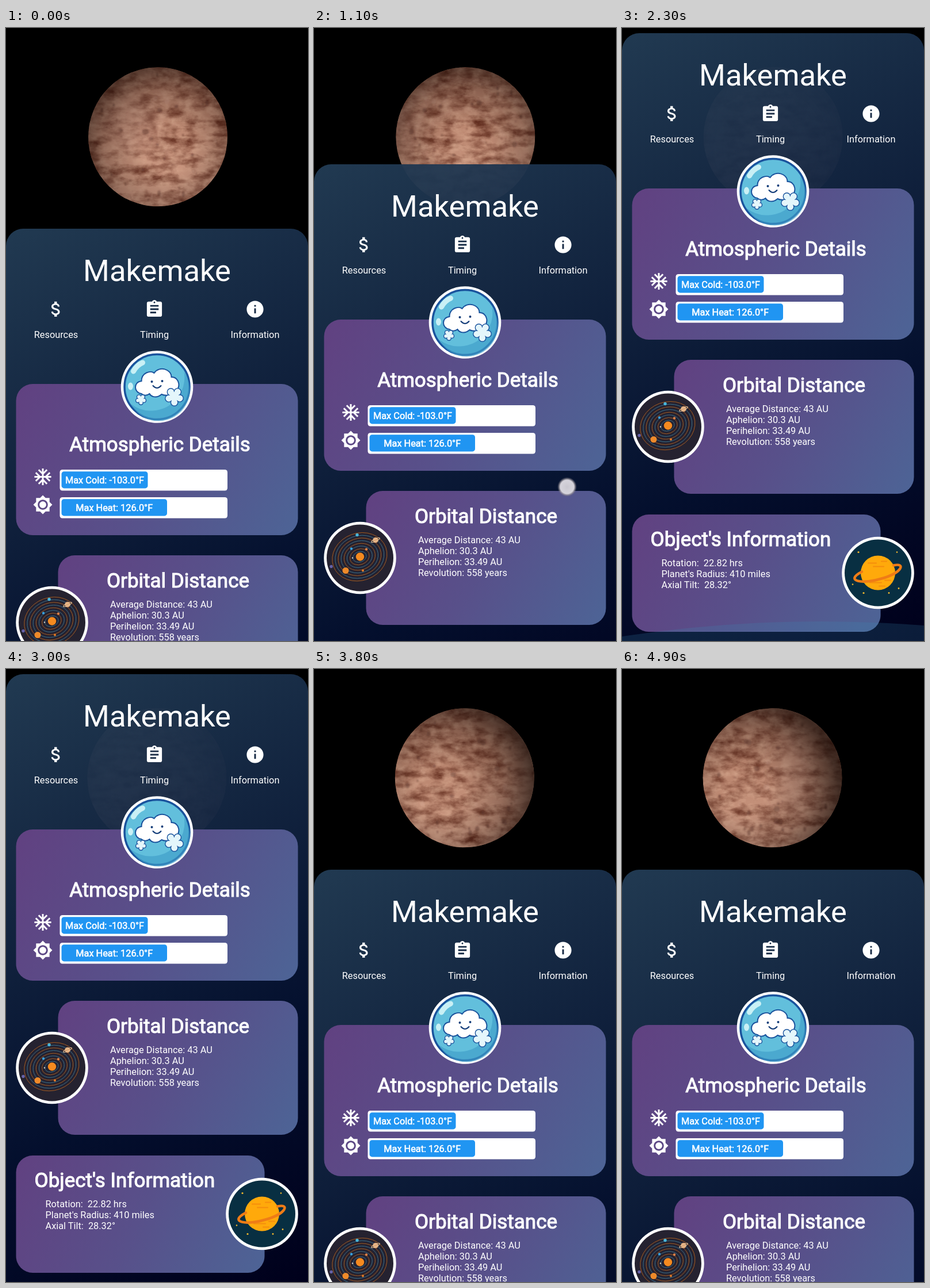
Animation of 525x1066 px, one loop 5 s. Source, as an HTML page:

```html
<!DOCTYPE html>
<html lang="en">
<head>
<meta charset="utf-8">
<title>Makemake</title>
<style>
  html, body { margin: 0; width: 100%; height: 100%; overflow: hidden; background: #000; }
  svg { display: block; width: 525px; height: 1066px; }
  text { font: 16.33px Roboto, sans-serif; fill: #fff; white-space: pre; }
  .title { font-size: 52.5px; }
  .heading { font-size: 35px; stroke: #fff; stroke-width: 1.1px; }
  .value { stroke: #fff; stroke-width: .55px; }
  .mid { text-anchor: middle; }
</style>
</head>
<body>
<svg viewBox="0 0 525 1066" xmlns="http://www.w3.org/2000/svg">
  <defs id="defs">
    <linearGradient id="panelFill" gradientUnits="userSpaceOnUse" x1="0" y1="0" x2="525" y2="1057">
      <stop offset="0" stop-color="#233d56"/>
      <stop offset=".65" stop-color="#041030"/>
      <stop offset="1" stop-color="#00001d"/>
    </linearGradient>
    <linearGradient id="cardStops">
      <stop offset="0" stop-color="#614181"/>
      <stop offset=".5" stop-color="#58508a"/>
      <stop offset="1" stop-color="#4d6496"/>
    </linearGradient>
    <radialGradient id="shade" gradientUnits="userSpaceOnUse" cy="22" r="165">
      <stop offset=".25" stop-color="#1c0d09" stop-opacity="0"/>
      <stop offset=".65" stop-color="#1c0d09" stop-opacity=".28"/>
      <stop offset="1" stop-color="#120805" stop-opacity=".72"/>
    </radialGradient>
    <linearGradient id="surface" x1="0" y1="0" x2=".2" y2="1">
      <stop offset="0" stop-color="#ad7b66"/>
      <stop offset=".5" stop-color="#bb8770"/>
      <stop offset="1" stop-color="#cd9b84"/>
    </linearGradient>
    <radialGradient id="touchFill">
      <stop offset="0" stop-color="#c9c7d0"/>
      <stop offset=".7" stop-color="#d6d4dc"/>
      <stop offset=".8" stop-color="#aaa5ab" stop-opacity=".8"/>
      <stop offset="1" stop-color="#6d6870" stop-opacity="0"/>
    </radialGradient>
    <filter id="darkGrain" x="0" y="0" width="1" height="1" color-interpolation-filters="sRGB">
      <feTurbulence type="fractalNoise" baseFrequency=".03 .06" numOctaves="5" seed="8"/>
      <feColorMatrix values="0 0 0 0 .4  0 0 0 0 .19  0 0 0 0 .13  2 0 0 0 -.72"/>
    </filter>
    <filter id="lightGrain" x="0" y="0" width="1" height="1" color-interpolation-filters="sRGB">
      <feTurbulence type="fractalNoise" baseFrequency=".05 .08" numOctaves="5" seed="3"/>
      <feColorMatrix values="0 0 0 0 .84  0 0 0 0 .66  0 0 0 0 .56  1.6 0 0 0 -.66"/>
    </filter>
    <filter id="soft" x="-.3" y="-.3" width="1.6" height="1.6"><feGaussianBlur stdDeviation="1.2"/></filter>
    <filter id="veil" x="-.6" y="-.6" width="2.2" height="2.2"><feGaussianBlur stdDeviation="13"/></filter>
    <clipPath id="disc"><circle r="121"/></clipPath>
    <clipPath id="badge"><circle r="59"/></clipPath>
  </defs>

  <rect width="525" height="1066"/>

  <g id="planet">
    <g clip-path="url(#disc)">
      <circle r="121" fill="url(#surface)"/>
      <g id="grain">
        <rect x="-125" y="-125" width="660" height="250" filter="url(#darkGrain)"/>
        <rect x="-125" y="-125" width="660" height="250" filter="url(#lightGrain)"/>
      </g>
      <g id="swaths" filter="url(#veil)" fill="#d2a491"></g>
      <g id="craters" filter="url(#soft)"></g>
      <circle r="122" fill="url(#shade)"/>
    </g>
  </g>

  <g id="panel">
    <rect width="525" height="1100" rx="30" fill="url(#panelFill)" fill-opacity=".945"/>
    <text class="title mid" x="262.5" y="90.8">Makemake</text>
    <g id="icons" fill="#fff"></g>
    <text class="mid" x="87" y="190">Resources</text>
    <text class="mid" x="258" y="190">Timing</text>
    <text class="mid" x="433" y="190">Information</text>

    <g id="cards"></g>

    <text class="heading mid" x="267.5" y="386.5">Atmospheric Details</text>
    <g id="bars"></g>
    <g id="gauges" fill="#fff"></g>

    <text class="heading mid" x="299" y="623.5">Orbital Distance</text>
    <g id="orbitText"></g>
    <text class="heading mid" x="206.5" y="892.3">Object's Information</text>
    <g id="objectText"></g>

    <g transform="translate(262.5 275)">
      <circle r="62.8" fill="#fff"/>
      <circle r="56.5" fill="#62bfdc" stroke="#1a539d" stroke-width="3.5"/>
      <path d="M47 -26A54 54 0 1 1 -45 30A58 58 0 0 0 47 -26Z" fill="#3f9fca" opacity=".65"/>
      <path d="M-41 -27Q-35 -38 -25 -42" fill="none" stroke="#c9f0f5" stroke-width="9" stroke-linecap="round"/>
      <ellipse cx="-46" cy="-1" rx="4.5" ry="6.5" fill="#c9f0f5"/>
      <path d="M-27 12C-41 10 -41 -9 -27 -10C-27 -25 -11 -29 -5 -24C4 -37 25 -31 25 -17C39 -18 43 4 30 8C25 17 12 15 8 13C0 20 -10 18 -13 12C-18 16 -24 15 -27 12Z"
        fill="#fff" stroke="#1a539d" stroke-width="2"/>
      <g fill="#143d79"><circle cx="-9" cy="-9" r="2"/><circle cx="9" cy="-10" r="2"/></g>
      <path d="M-7 -2Q0 6 7 -2" fill="none" stroke="#143d79" stroke-width="2" stroke-linecap="round"/>
      <g id="flakes"></g>
    </g>

    <g transform="translate(80 684.5)">
      <circle r="62.8" fill="#fff"/>
      <circle r="58" fill="#252230"/>
      <g id="orbits" fill="none" stroke-width=".9" clip-path="url(#badge)"></g>
      <g id="bodies"></g>
      <ellipse cx="27" cy="-31" rx="8" ry="2" transform="rotate(-25 27 -31)" fill="none" stroke="#e9c9a0" stroke-width="1.2"/>
    </g>

    <g transform="translate(445 938.5)">
      <circle r="62.8" fill="#fff"/>
      <circle r="58" fill="#082f42"/>
      <circle r="30" fill="#ffa90b"/>
      <g fill="none" stroke="#f58e0c" stroke-width="2.2" stroke-linecap="round">
        <path d="M-17 -17H-3M6 -20H15M-8 -11H10M-14 17H6M2 23H12M12 13H22"/>
      </g>
      <path d="M-28 -2C-60 15 -25 20 6 10C42 0 49 -18 27 -13" fill="none" stroke="#ef7c16" stroke-width="4.5" stroke-linecap="round"/>
      <g id="stars" fill="#f4b92d"></g>
    </g>
  </g>

  <circle id="glow" cx="345" cy="3322" r="2290" fill="#3b8eb5"/>
  <circle id="touch" r="17" fill="url(#touchFill)"/>
</svg>

<script>
const LOOP = 5000, STEP = 100, RADIUS = 121, SPIN = 0.65;
const $ = id => document.getElementById(id);

function add(parent, tag, attrs, text) {
  const node = document.createElementNS('http://www.w3.org/2000/svg', tag);
  for (const key in attrs) node.setAttribute(key, attrs[key]);
  if (text) node.textContent = text;
  return parent.appendChild(node);
}

function random(seed) {
  return () => (seed = (seed * 16807) % 2147483647) / 2147483647;
}

// The gradient runs from corner to corner in real pixels, so its bands stay square to that diagonal.
function card(x, y, width, height) {
  const id = 'card' + y;
  add($('defs'), 'linearGradient', {
    id, href: '#cardStops', gradientUnits: 'userSpaceOnUse', x1: x, y1: y, x2: x + width, y2: y + height });
  add($('cards'), 'rect', { x, y, width, height, rx: 29, fill: `url(#${id})` });
}

function icon(parent, x, y, d) {
  add(parent, 'path', { d, transform: `translate(${x - 17.5} ${y - 17.5}) scale(1.4583)` });
}

function lines(parent, x, y, rows) {
  rows.forEach((row, i) => add(parent, 'text', { x, y: y + i * 19.1 }, row));
}

function bar(y, width, label) {
  add($('bars'), 'rect', { x: 93.5, y, width: 291.5, height: 36.5, rx: 4.5, fill: '#fff' });
  add($('bars'), 'rect', { x: 96.5, y: y + 3.2, width, height: 29.2, rx: 4.5, fill: '#2095f2' });
  add($('bars'), 'text', { x: 96.5 + width / 2, y: y + 23.6, class: 'value mid' }, label);
}

function flake(x, y, size) {
  for (const [grow, fill] of [[1.4, '#1a539d'], [0, '#e4f6fb']]) {
    for (let i = 0; i < 5; i++) {
      const a = i * Math.PI * 0.4 + 0.3;
      add($('flakes'), 'circle', {
        cx: x + Math.cos(a) * size, cy: y + Math.sin(a) * size, r: size * 0.55 + grow, fill });
    }
    add($('flakes'), 'circle', { cx: x, cy: y, r: size * 0.8, fill: '#e4f6fb' });
  }
}

card(17.5, 270, 490, 263);
card(90.5, 568, 417, 233);
card(17.5, 837, 432, 204);

icon($('icons'), 87, 140, 'M11.8 10.9c-2.27-.59-3-1.2-3-2.15 0-1.09 1.01-1.85 2.7-1.85 1.78 0 2.44.85 2.5 2.1h2.21c-.07-1.72-1.12-3.3-3.21-3.81V3h-3v2.16c-1.94.42-3.5 1.68-3.5 3.61 0 2.31 1.91 3.46 4.7 4.13 2.5.6 3 1.48 3 2.41 0 .69-.49 1.79-2.7 1.79-2.06 0-2.87-.92-2.98-2.1h-2.2c.12 2.19 1.76 3.42 3.68 3.83V21h3v-2.15c1.95-.37 3.5-1.5 3.5-3.55 0-2.84-2.43-3.81-4.7-4.4z');
icon($('icons'), 258, 140, 'M19 3h-4.18C14.4 1.84 13.3 1 12 1c-1.3 0-2.4.84-2.82 2H5c-1.1 0-2 .9-2 2v14c0 1.1.9 2 2 2h14c1.1 0 2-.9 2-2V5c0-1.1-.9-2-2-2zm-7 0c.55 0 1 .45 1 1s-.45 1-1 1-1-.45-1-1 .45-1 1-1zm2 14H7v-2h7v2zm3-4H7v-2h10v2zm0-4H7V7h10v2z');
icon($('icons'), 433, 140, 'M12 2C6.48 2 2 6.48 2 12s4.48 10 10 10 10-4.48 10-10S17.52 2 12 2zm1 15h-2v-6h2v6zm0-8h-2V7h2v2z');
icon($('gauges'), 64, 431.5, 'M22 11h-4.17l3.24-3.24-1.41-1.42L15 11h-2V9l4.66-4.66-1.42-1.41L13 6.17V2h-2v4.17L7.76 2.93 6.34 4.34 11 9v2H9L4.34 6.34 2.93 7.76 6.17 11H2v2h4.17l-3.24 3.24 1.41 1.42L9 13h2v2l-4.66 4.66 1.42 1.41L11 17.83V22h2v-4.17l3.24 3.24 1.42-1.41L13 15v-2h2l4.66 4.66 1.41-1.42L17.83 13H22z');
icon($('gauges'), 64, 480, 'M20 8.69V4h-4.69L12 .69 8.69 4H4v4.69L.69 12 4 15.31V20h4.69L12 23.31 15.31 20H20v-4.69L23.31 12 20 8.69zM12 18c-3.31 0-6-2.69-6-6s2.69-6 6-6 6 2.69 6 6-2.69 6-6 6zm0-10c-2.21 0-4 1.79-4 4s1.79 4 4 4 4-1.79 4-4-1.79-4-4-4z');

bar(419, 150, 'Max Cold: -103.0°F');
bar(467, 183.5, 'Max Heat: 126.0°F');
lines($('orbitText'), 181, 658.5,
  ['Average Distance: 43 AU', 'Aphelion: 30.3 AU', 'Perihelion: 33.49 AU', 'Revolution: 558 years']);
lines($('objectText'), 68.5, 927,
  ['Rotation:  22.82 hrs', "Planet's Radius: 410 miles", 'Axial Tilt:  28.32°']);

flake(-28, 22, 5.5);
flake(30, 17, 10);

for (let i = 0; i < 8; i++) {
  add($('orbits'), 'ellipse', {
    cy: -2, rx: 12 + i * 5.2, ry: 9 + i * 4.6, transform: 'rotate(-20)',
    stroke: i % 2 ? '#a85c20' : '#35708f' });
}
for (const [cx, cy, r, fill] of [
  [0, -2, 7.2, '#f58a1f'], [-25, 22, 5.5, '#ee8a2a'], [27, -31, 4.8, '#e0a777'],
  [-5, -40, 2.7, '#48b7dc'], [-50, 15, 2.7, '#6662a8'], [11, -15, 2.2, '#d9804a'],
  [-15, -16, 2.2, '#3aa0dc'], [5, 22, 2, '#e27a28'], [-13, 0, 1.2, '#d8d0c8']
]) add($('bodies'), 'circle', { cx, cy, r, fill });

for (const [cx, cy, r] of [[-34, -36, 1.6], [33, -36, 1.3], [-44, 20, 1.3], [-25, 35, 1.6], [19, 35, 1.4], [36, 27, 1.4]])
  add($('stars'), 'circle', { cx, cy, r });

// Surface marks are placed by longitude and latitude, then projected as the globe turns.
const rand = random(4711);
const marks = [[3.55, 0.1, 32, 75], [-0.4, 0.15, 55, 50]].map(([lon, lat, rx, ry]) =>
  ({ lon, lat, rx, ry, node: add($('swaths'), 'ellipse', { opacity: 0.35 }) }));
for (let i = 0; i < 230; i++) {
  const size = 1.5 + 5 * rand() ** 3;
  const dark = rand() < 0.75;
  marks.push({
    lon: rand() * Math.PI * 2, lat: Math.asin(rand() * 2 - 1), rx: size, ry: size * 0.85,
    node: add($('craters'), 'ellipse', { fill: dark ? '#572c22' : '#dcb19f', opacity: dark ? 0.4 : 0.25 })
  });
}

function turnPlanet(t) {
  const turn = SPIN * t / 1000;
  const drift = Math.min(1, t / 4300);
  $('planet').setAttribute('transform', `translate(${264 - 2.5 * drift} 189.3)`);
  $('grain').setAttribute('transform', `translate(${-turn * RADIUS} 0)`);
  $('shade').setAttribute('cx', 15 - 65 * drift);
  for (const { lon, lat, rx, ry, node } of marks) {
    const facing = Math.cos(lat) * Math.cos(lon - turn);
    node.setAttribute('cx', RADIUS * Math.cos(lat) * Math.sin(lon - turn));
    node.setAttribute('cy', -RADIUS * Math.sin(lat));
    node.setAttribute('rx', Math.max(0, rx * facing));
    node.setAttribute('ry', facing > 0 ? ry : 0);
  }
}

function track(keys, t) {
  if (t <= keys[0][0]) return keys[0][1];
  for (let i = 1; i < keys.length; i++) {
    const [t0, a] = keys[i - 1], [t1, b] = keys[i];
    if (t <= t1) return a + (b - a) * (t - t0) / (t1 - t0);
  }
  return keys[keys.length - 1][1];
}

const panelTop = [[800, 349], [900, 330], [1100, 237], [1400, 50], [1500, 9], [3200, 9], [3300, 16], [3500, 64.5], [3600, 349]];
const glowLevel = [[1900, 0], [2100, 0.2], [2300, 0.2], [2500, 0]];
const drags = [
  { from: 800, to: 1600, x: [[1100, 440], [1500, 448]], y: [[800, 910], [900, 891], [1100, 798], [1400, 611], [1500, 567], [1600, 545]] },
  { from: 3200, to: 3500, x: [[3200, 432], [3500, 435]], y: [[3200, 470], [3300, 477], [3500, 526]] }
];

function draw(t) {
  turnPlanet(t);
  $('panel').setAttribute('transform', `translate(0 ${track(panelTop, t)})`);
  $('glow').setAttribute('opacity', track(glowLevel, t));
  const drag = drags.find(d => t >= d.from && t <= d.to);
  $('touch').setAttribute('opacity', drag ? 1 : 0);
  if (drag) $('touch').setAttribute('transform', `translate(${track(drag.x, t)} ${track(drag.y, t)})`);
}

const start = performance.now();
let shown = -1;
function tick() {
  const t = Math.floor((performance.now() - start) % LOOP / STEP) * STEP;
  if (t !== shown) draw(shown = t);
  requestAnimationFrame(tick);
}
tick();
</script>
</body>
</html>
```
